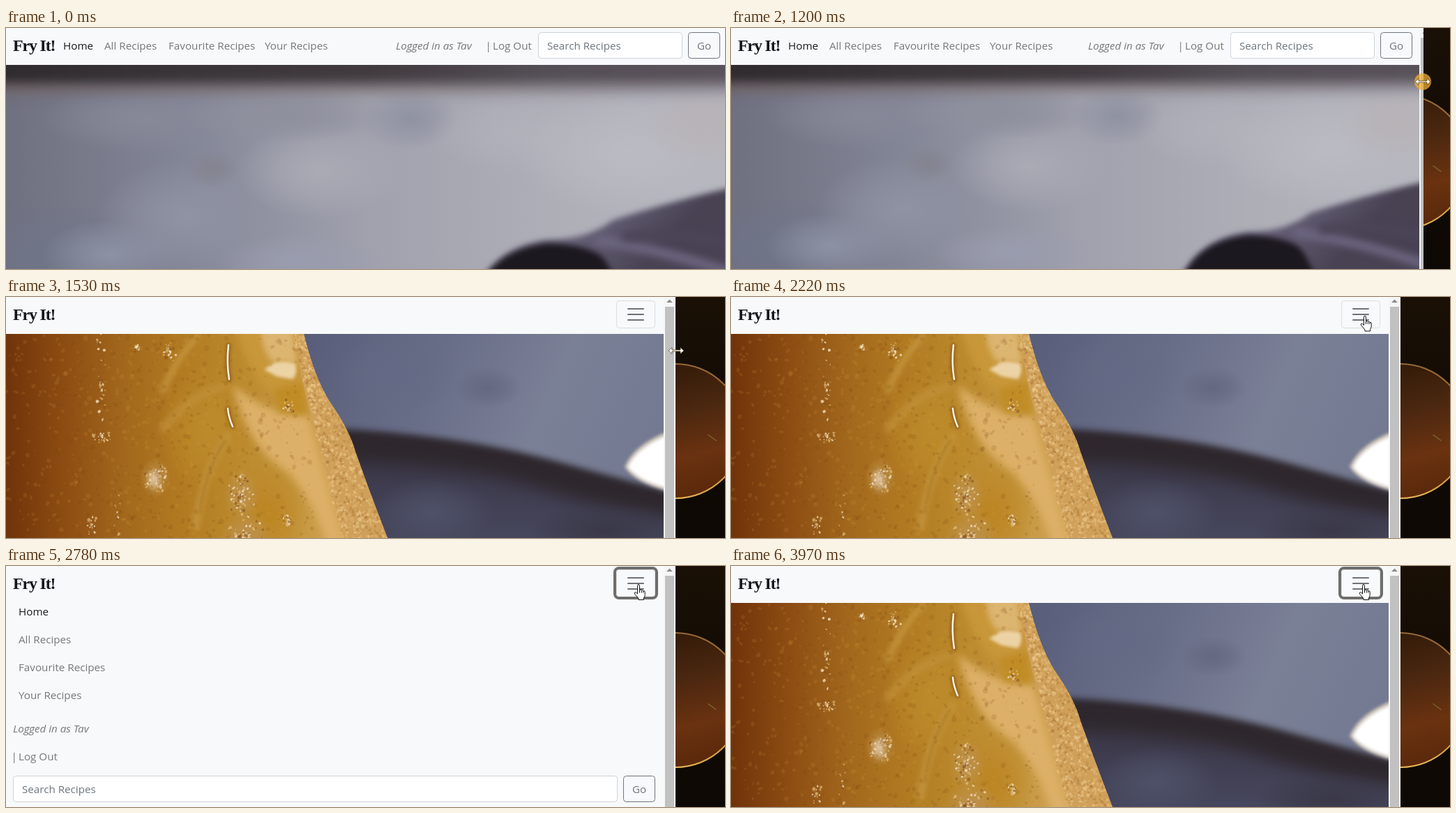
An HTML page with a canvas that plays this animation: 1031 px wide and 346 px high, repeating every 4440 ms.

```html
<!DOCTYPE html>
<html lang="en">
<head>
<meta charset="utf-8">
<title>Responsive navbar</title>
<style>
html, body { margin: 0; width: 100%; height: 100%; overflow: hidden; background: #f8f9fa; }
canvas, svg { position: absolute; left: 0; top: 0; width: 1031px; height: 346px; }
text { font: 15.2px "Open Sans", sans-serif; fill: #777879; white-space: pre; }
.brand { font: bold 24px "Liberation Serif", serif; letter-spacing: -1.2px; fill: #15161c; }
.on { fill: #191919; }
.user { font-style: italic; }
.hint { fill: #6c757d; }
.field { fill: #fff; stroke: #ced4da; }
.go { fill: none; stroke: #6c757d; }
.hand, .arrow { fill: #fff; stroke: #111; stroke-linejoin: round; }
</style>
</head>
<body>
<canvas id="page" width="1031" height="346"></canvas>
<svg viewBox="0 0 1031 346">
  <defs><clipPath id="fold"><rect id="foldBox" y="45" width="943" height="0"/></clipPath></defs>
  <text class="brand" x="10" y="33">Fry It!</text>
  <g id="wideLeft"></g>
  <g id="wideRight"></g>
  <g id="menu" clip-path="url(#fold)"></g>
  <g id="burger">
    <rect x="875.5" y="5.5" width="55" height="39" rx="4" fill="none" stroke="#dcddde"/>
    <path d="M892 17h22M892 25h22M892 33h22" stroke="#707079" stroke-width="2" stroke-linecap="round"/>
    <rect id="ring" x="873" y="3" width="60" height="43" rx="6" fill="none" stroke="#6e6d6c" stroke-width="4"/>
  </g>
  <g id="pointer">
    <circle id="press" r="12" fill="#f0b032" fill-opacity=".74"/>
    <path id="resize" d="M-11 0L-6-4.500V-1H6V-4.500L11 0L6 4.500V1H-6V4.500Z" fill="#fff" stroke="#4a3510" stroke-width=".7"/>
    <path id="arrow" class="arrow" d="M0 0V16L4 12.500L6.500 18.500L9 17.500L6.500 11.500H11.500Z"/>
    <path id="hand" class="hand" transform="translate(-6.5)" d="M5 2Q5 0 6.500 0Q8 0 8 2V8Q10 6.800 10.800 8.500Q12.800 7.500 13.400 9.300Q15.700 8.700 15.700 11V15Q15.700 17 14 19.500V22H6.500V20Q4 17 1.200 13.800Q0 12 1.300 11.300Q3 10.800 5 13.500ZM8 8V12M10.800 9V12M13.400 9.500V12"/>
  </g>
</svg>
<script>
const LOOP = 4440, W = 1031, H = 346, BAR = 53;
const WIDE = 1034, NARROW = 943, BREAK = 975, PHOTO = 400;
const $ = id => document.getElementById(id);
const ctx = $('page').getContext('2d');

// ---------- navbar ----------
const label = (x, y, s, cls = '') => `<text x="${x}" y="${y}" class="${cls}">${s}</text>`;
const box = (x, y, w, cls) =>
  `<rect x="${x + .5}" y="${y + .5}" width="${w - 1}" height="37" rx="4" class="${cls}"/>`;
const links = ['Home', 'All Recipes', 'Favourite Recipes', 'Your Recipes'];
const account = (x1, y1, x2, y2) =>
  label(x1, y1, 'Logged in as Tav', 'user') + label(x2 - 2.5, y2, '|') + label(x2 + 8, y2, 'Log Out');
const search = (x, y, w) =>
  box(x, y, w, 'field') + label(x + 13, y + 25, 'Search Recipes', 'hint') +
  box(x + w + 8, y, 46, 'go') + label(x + w + 21, y + 25, 'Go', 'hint');

$('wideLeft').innerHTML = links.map((s, i) => label([82, 141, 233, 371][i], 31, s, i ? '' : 'on')).join('');
$('wideRight').innerHTML = account(559, 31, 690, 31) + search(763, 6, 207);
$('menu').innerHTML = links.map((s, i) => label(18, 71 + 40 * i, s, i ? '' : 'on')).join('') +
  account(10, 239, 10, 279) + search(10, 301, 867);

// ---------- pictures ----------
function paint(w, h, draw) {
  const c = document.createElement('canvas');
  c.width = w; c.height = h;
  draw(c.getContext('2d'));
  return c;
}
function ramp(g, x0, y0, x1, y1, ...stops) {
  const r = g.createLinearGradient(x0, y0, x1, y1);
  stops.forEach((c, i) => r.addColorStop(i / (stops.length - 1), c));
  return r;
}
function blob(g, x, y, rx, ry, color) {
  g.save();
  g.translate(x, y);
  g.scale(rx, ry);
  const r = g.createRadialGradient(0, 0, 0, 0, 0, 1);
  r.addColorStop(0, color);
  r.addColorStop(.5, color + '90');
  r.addColorStop(1, color + '00');
  g.fillStyle = r;
  g.fillRect(-1, -1, 2, 2);
  g.restore();
}
function shape(g, d, fill, blur = 0) {
  g.filter = blur ? `blur(${blur}px)` : 'none';
  g.fillStyle = fill;
  g.fill(new Path2D(d));
  g.filter = 'none';
}
function line(g, d, color, width, blur = 0) {
  g.filter = blur ? `blur(${blur}px)` : 'none';
  g.strokeStyle = color;
  g.lineWidth = width;
  g.lineCap = 'round';
  g.stroke(new Path2D(d));
  g.filter = 'none';
}
function rng(seed) {
  return () => (seed = (seed * 16807) % 2147483647) / 2147483647;
}

const table = paint(WIDE, PHOTO, g => {
  g.fillStyle = ramp(g, 0, 0, WIDE, 0, '#6f7080', '#838697', '#a0a1ad', '#aeaeb7', '#b6b6bf');
  g.fillRect(0, 0, WIDE, PHOTO);
  blob(g, 60, 330, 170, 80, '#6f7487');
  blob(g, 150, 325, 100, 50, '#8e92a5');
  blob(g, 260, 270, 130, 80, '#9093a4');
  blob(g, 450, 205, 120, 70, '#aaabb5');
  blob(g, 200, 130, 150, 50, '#878999');
  blob(g, 295, 202, 38, 28, '#84848f');
  blob(g, 580, 130, 70, 45, '#8f92a2');
  blob(g, 400, 125, 150, 40, '#8f909d');
  blob(g, 740, 150, 130, 60, '#b1b1ba');
  blob(g, 900, 180, 170, 90, '#bbbbc4');
  blob(g, 420, 335, 120, 40, '#9a9daf');
  blob(g, 1000, 140, 90, 60, '#b8b3b6');
  g.filter = 'blur(10px)';
  g.fillStyle = ramp(g, 0, 0, WIDE, 0, '#6c5f60', '#7b7175', '#85808a');
  g.fillRect(-30, 70, 1100, 22);
  g.filter = 'blur(7px)';
  g.fillStyle = ramp(g, 0, 0, WIDE, 0, '#302b2e', '#3a3538', '#413b3f', '#544e56', '#5a525a');
  g.fillRect(-30, 10, 1100, 69);
  g.filter = 'none';
  shape(g, 'M690 350Q720 312 775 304Q835 304 870 276Q950 250 1045 228V410H650Z',
    ramp(g, 800, 270, 900, 360, '#6b667c', '#5d576d', '#484253'), 4);
  line(g, 'M850 305Q940 318 1040 352', '#6d6681', 14, 6);
  line(g, 'M890 300Q960 290 1040 310', '#4b4558', 14, 6);
  shape(g, 'M692 350Q722 314 778 309Q830 311 852 326Q868 338 890 410H650Z', '#1c181f', 4);
});

const pie = paint(NARROW, PHOTO, g => {
  const rand = rng(71);
  const speck = (x, y, r, c) => {
    g.fillStyle = c;
    g.beginPath();
    g.ellipse(x, y, r, r * (.5 + rand() * .5), rand() * 3, 0, 7);
    g.fill();
  };
  g.fillStyle = ramp(g, 450, 40, 920, 250, '#595e7b', '#686d87', '#7a8096', '#737990');
  g.fillRect(0, 0, NARROW, PHOTO);
  blob(g, 690, 130, 50, 30, '#646981');
  blob(g, 560, 110, 90, 60, '#646a85');
  shape(g, 'M440 187Q640 195 790 236T980 286V420H440Z', '#2e272d', 5);
  shape(g, 'M440 238Q640 235 760 274T980 318V420H440Z', ramp(g, 0, 250, 0, 380, '#3c394a', '#4a4c64'), 12);
  blob(g, 610, 310, 90, 50, '#4e5169');
  blob(g, 860, 335, 110, 40, '#3a3848');
  shape(g, 'M887 244Q902 208 960 189V281Q905 270 887 244Z', '#d0c6bc', 2);
  shape(g, 'M892 244Q906 213 960 194V277Q908 266 892 244Z', '#fff', 2);

  // filling and crust
  g.save();
  g.clip(new Path2D('M0 0H405L427 53Q442 115 464 150Q492 190 501 222Q520 276 547 346L567 400H0Z'));
  g.fillStyle = ramp(g, 0, 0, 490, 0, '#70330a', '#8c4c12', '#a1661c', '#b07921', '#ba882b', '#c4963e', '#d3a659');
  g.fillRect(0, 0, 570, PHOTO);
  blob(g, 290, 190, 70, 90, '#bd8b2a');
  blob(g, 375, 310, 60, 80, '#bc8523');
  shape(g, 'M325 125Q370 168 434 172Q455 250 482 346L472 400Q452 300 402 250Q345 215 325 125Z', '#dcb068', 6);
  shape(g, 'M328 40H412L424 128L385 138Q345 110 328 40Z', '#c89739', 6);
  shape(g, 'M366 40H410L418 96L380 92Q364 70 366 40Z', '#dcb571', 4);
  shape(g, 'M385 132L426 122L432 168L392 166Z', '#c08c25', 5);
  line(g, 'M225 135Q240 95 275 55', '#c89a41', 7, 4);
  line(g, 'M225 190Q262 140 315 128', '#c09039', 9, 5);
  line(g, 'M272 330Q285 245 318 200', '#c4963f', 9, 4);
  line(g, 'M278 310Q285 250 315 205', '#a06c1c', 2, 2);
  for (let i = 0; i < 1400; i++)
    speck(rand() * 440, rand() * PHOTO, 1 + rand() * 3, i % 2 ? '#7a430d28' : '#d09a3a28');
  shape(g, 'M396 0L414 53Q424 130 442 185Q462 262 484 346L494 400H580V0Z', '#cfa05a');
  for (let i = 0; i < 1300; i++) {
    const y = rand() * PHOTO, x = 398 + y * .24 + rand() * (22 + y * .15);
    speck(x, y, 1 + rand() * 2, ['#ebcb8e90', '#b27f3a80', '#dfb46c90'][i % 3]);
  }
  g.restore();

  // sugar glints: x, y, spread x, spread y, count
  [[235, 78, 11, 15, 32], [188, 72, 7, 7, 14], [137, 201, 14, 9, 32], [135, 130, 8, 80, 46],
   [214, 260, 17, 24, 70], [338, 285, 20, 32, 75], [345, 340, 28, 25, 60], [405, 322, 8, 10, 20],
   [405, 157, 9, 14, 25], [122, 328, 11, 14, 28], [160, 320, 6, 45, 15]].forEach(([x, y, sx, sy, n]) => {
    if (n > 46) blob(g, x, y, sx * 1.3, sy * 1.2, '#bd924f');
    for (let i = 0; i < n; i++) {
      const a = rand() * 6.283, r = rand();
      speck(x + Math.cos(a) * r * sx, y + Math.sin(a) * r * sy, .7 + rand() * 1.8,
        ['#f4e5c8c0', '#dfb978b0', '#8b5520a0'][i % 3]);
    }
  });
  blob(g, 212, 262, 12, 18, '#dcc19a');
  shape(g, 'M370 104L386 94Q402 91 415 96Q419 110 411 118L388 114Z', '#ecd3a6', 2);
  line(g, 'M319 69Q316 95 320 118M318 160Q319 172 325 186', '#8f5c18', 6, 2);
  line(g, 'M319 69Q316 95 320 118M318 160Q319 172 325 186', '#fbf3e2', 2.5, .4);
});

const desktop = paint(W, H, g => {
  g.fillStyle = ramp(g, 0, 0, 0, H, '#1a1006', '#120b04', '#0d0804');
  g.fillRect(0, 0, W, H);
  const disc = 'M863.500 192.500a96.500 96.500 0 1 0 193 0a96.500 96.500 0 1 0-193 0Z';
  shape(g, disc, ramp(g, 960, 96, 1010, 290, '#331b08', '#4a2710', '#6a3210', '#57270a'));
  line(g, disc, ramp(g, 0, 96, 0, 290, '#96683a', '#b06a20', '#e8b458'), 2, .4);
  line(g, 'M1007 198L1018 206', '#77682a', 1.5);
});

// ---------- motion ----------
const run = (from, n, gap) => Array.from({ length: n }, (_, i) => from + Math.round(i * gap / 10) * 10);
const ticks = [0, ...run(850, 8, 68.6), 1400, 1470, 1530, ...run(1730, 8, 70), ...run(2290, 8, 70),
  3510, 3640, 3700, 3770, 3840, 3900, 3970];
const dragKeys = [[700, 1051], [780, 1048], [850, 1046], [1060, 1014], [1260, 982], [1330, 976], [1400, 967], [1460, 960]];

function edgeAt(t) {
  const i = dragKeys.findIndex(k => k[0] > t);
  if (i === 0) return dragKeys[0][1];
  if (i < 0) return 960;
  const [t0, a] = dragKeys[i - 1], [t1, b] = dragKeys[i];
  return a + (b - a) * (t - t0) / (t1 - t0);
}
const clamp = v => Math.min(1, Math.max(0, v));
const smooth = v => v * v * (3 - 2 * v);

// CSS "ease", cubic-bezier(.25, .1, .25, 1)
function ease(x) {
  const curve = (s, a, b) => 3 * s * (1 - s) ** 2 * a + 3 * s * s * (1 - s) * b + s ** 3;
  let lo = 0, hi = 1;
  for (let i = 0; i < 20; i++) {
    const mid = (lo + hi) / 2;
    if (curve(mid, .25, .25) < x) lo = mid; else hi = mid;
  }
  return x <= 0 ? 0 : x >= 1 ? 1 : curve(lo, .1, 1);
}
const openness = t => t < 3000 ? ease((t - 2410) / 350) : 1 - ease((t - 3617) / 350);

const show = (id, on) => $(id).style.display = on ? '' : 'none';
const shift = (id, x, y = 0) => $(id).setAttribute('transform', `translate(${x} ${y})`);

function pointerAt(t, edge) {
  if (t < 1730) return [Math.max(961, edge - 1), 77];
  if (t < 2290) {
    const p = smooth(clamp((t - 1660) / 560));
    return [961 - 52 * p, 77 - 50 * p];
  }
  return [907, 26.5];
}

function drawPage(w, edge, bottom, hover) {
  ctx.fillStyle = '#f8f9fa';
  ctx.fillRect(0, 0, W, H);
  ctx.save();
  ctx.beginPath();
  ctx.rect(0, bottom, w, H - bottom);
  ctx.clip();
  if (w >= BREAK) {
    const s = w / WIDE;
    ctx.drawImage(table, 0, BAR * (1 - s), w, PHOTO * s);
  } else {
    ctx.drawImage(pie, 0, -31 * (w - NARROW) / 22, w, PHOTO * w / NARROW);
  }
  ctx.restore();

  ctx.fillStyle = '#f6f6f6';
  ctx.fillRect(w, 0, 17, H);
  ctx.fillStyle = hover ? '#a8a8a8' : '#c1c1c1';
  ctx.fillRect(w + 2, 14, 13, H);
  shape(ctx, `M${w + 4} 8h9l-4.500-4.500Z`, '#8b8b8b');
  if (edge < W) ctx.drawImage(desktop, edge, 0, W - edge, H, edge, 0, W - edge, H);
}

function render(time) {
  const t = ticks.filter(k => k <= time).pop();
  const edge = Math.round(edgeAt(t)), w = Math.round(edgeAt(t - 70)) - 17;
  const wide = w >= BREAK;
  const bottom = BAR + 294 * openness(t);
  const [x, y] = pointerAt(t, edge);
  const sizing = t < 1730 || x >= 959;
  const onButton = x < 931 && y < 45;

  drawPage(w, edge, bottom, !sizing && x > NARROW);
  show('wideLeft', wide);
  show('wideRight', wide);
  show('burger', !wide);
  shift('wideRight', w - WIDE);
  shift('burger', w - NARROW);
  show('ring', t >= 2290);
  show('menu', bottom > BAR);
  $('foldBox').setAttribute('height', Math.max(0, bottom - BAR));
  shift('pointer', x, y);
  show('press', (t >= 850 && t < 1530) || t === 2290 || t === 2360 || t === 3510);
  show('resize', t >= 850 && sizing);
  show('arrow', !sizing && !onButton);
  show('hand', !sizing && onButton);
}

const start = performance.now();
function frame() {
  render((performance.now() - start) % LOOP);
  requestAnimationFrame(frame);
}
frame();
</script>
</body>
</html>
```
